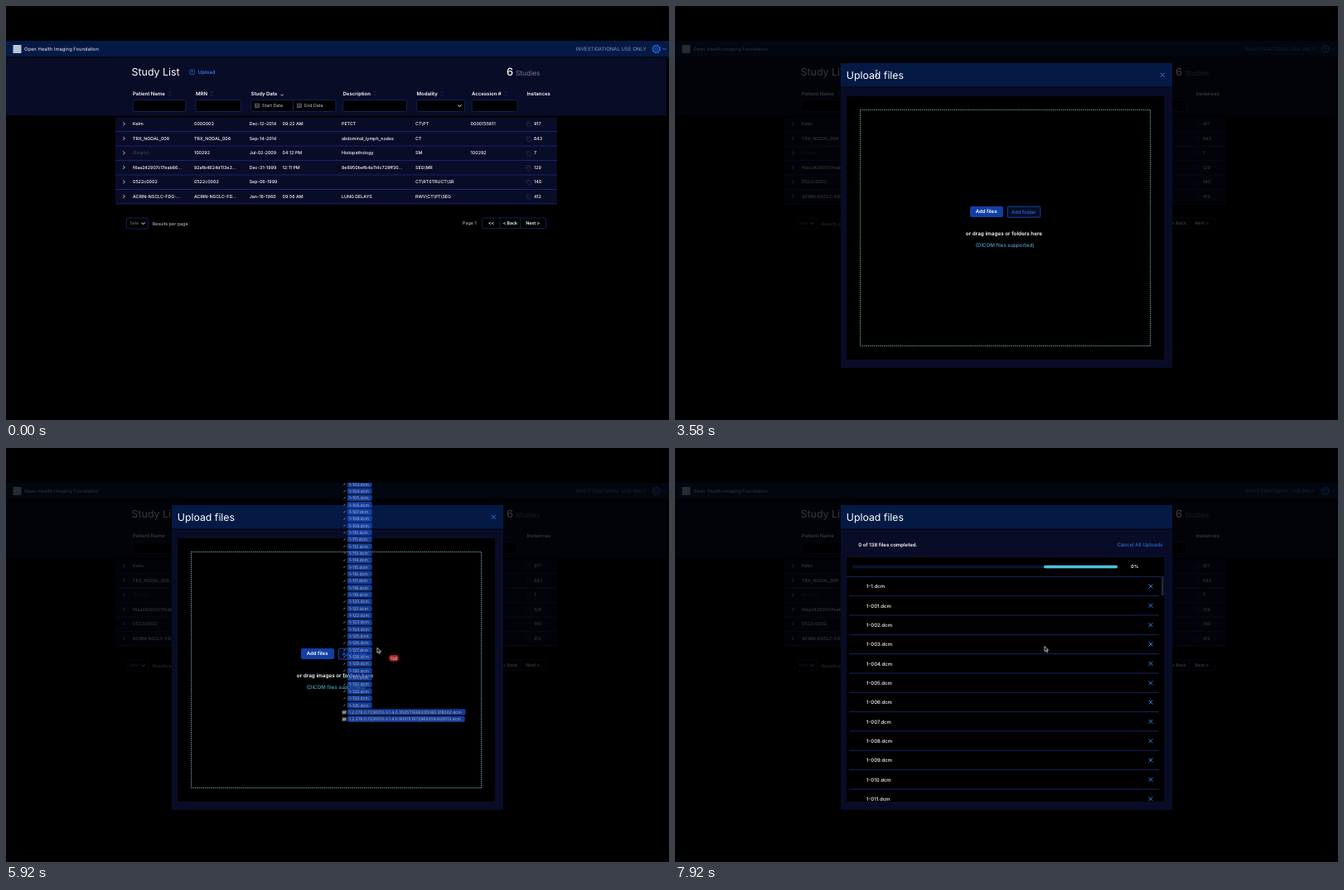
These frames come from a looping animation (800 px wide and 500 px high, 8 s). An HTML page:

```html
<!DOCTYPE html>
<html lang="en">
<head>
<meta charset="utf-8">
<title>Study list upload</title>
<style>
html, body { margin: 0; width: 100%; height: 100%; overflow: hidden; background: #000; }
svg { display: block; width: 100%; height: 100%; }
text { font-family: Inter, Roboto, sans-serif; text-rendering: geometricPrecision; white-space: pre; }
.loop { animation: 8s step-end infinite; }
#modal { animation-name: modal; }
#drop { animation-name: drop; }
#list { animation-name: list; }
#arrow { animation-name: arrow; }
#hand { animation-name: hand; }
#beam { animation-name: beam; }
#plus { animation-name: plus; }
#cursor { animation: cursor 8s linear infinite; }
#drag { animation: drag 8s linear infinite; }
#files { animation: gather 8s ease-out infinite; }
#bar { animation: side 1s ease-in-out -.96s infinite alternate; }

@keyframes modal { 0% { visibility: hidden } 44.7%, 100% { visibility: visible } }
@keyframes drop { 0% { opacity: 1 } 89.55%, 100% { opacity: 0 } }
@keyframes list { 0% { opacity: 0 } 89.55%, 100% { opacity: 1 } }
@keyframes arrow {
  0% { opacity: 0 } 22.8% { opacity: 1 } 33.3% { opacity: 0 } 45.8% { opacity: 1 }
  52.1% { opacity: 0 } 59.3%, 100% { opacity: 1 }
}
@keyframes hand { 0% { opacity: 0 } 33.3% { opacity: 1 } 44.7%, 100% { opacity: 0 } }
@keyframes beam { 0% { opacity: 0 } 44.7% { opacity: 1 } 45.8%, 100% { opacity: 0 } }
@keyframes plus { 0% { opacity: 0 } 80.2% { opacity: 1 } 84.3%, 100% { opacity: 0 } }
@keyframes cursor {
  0%, 22.6% { transform: translate(778px, 335px); animation-timing-function: ease-out }
  32.3% { transform: translate(246px, 81px) }
  36.5%, 44.8% { transform: translate(243px, 80px); animation-timing-function: ease-in-out }
  52.1% { transform: translate(805px, 262px); animation-timing-function: step-end }
  59.3% { transform: translate(772px, 266px) }
  61.7% { transform: translate(620px, 265px) }
  64.6% { transform: translate(525.5px, 261px) }
  68.8% { transform: translate(461px, 246px) }
  71.8% { transform: translate(448.5px, 242px) }
  77.1% { transform: translate(447px, 240px) }
  80%, 100% { transform: translate(446px, 239.5px) }
}
@keyframes drag {
  0%, 69.4% { opacity: 0 } 71.8%, 72.8% { opacity: .68 }
  77.1%, 82.2% { opacity: 1 } 84.4%, 100% { opacity: 0 }
}
@keyframes gather {
  0%, 69.4% { transform: translateX(-34px) }
  71.8%, 72.8% { transform: translateX(-22px) }
  77.1%, 100% { transform: none }
}
@keyframes side { from { transform: translateX(-80px) } to { transform: translateX(240px) } }
</style>
</head>
<body>
<svg id="stage" viewBox="0 0 800 500"></svg>
<script>
const NAVY = '#041a45', PANEL = '#090c27', EDGE = '#14296b', LINE = '#202c7c', BLUE = '#2f7df0';

// y is the vertical middle of the capitals
const text = (x, y, size, str, fill = '#fff', weight = 400) =>
  `<text x="${x}" y="${(y + size * .364).toFixed(2)}" font-size="${size}" fill="${fill}" font-weight="${weight}">${
    str.replace(/</g, '&lt;').replace(/>/g, '&gt;')}</text>`;
const rect = (x, y, w, h, fill, extra = '') =>
  `<rect x="${x}" y="${y}" width="${w}" height="${h}" fill="${fill}" ${extra}/>`;
const path = (d, stroke, width = .8, fill = 'none') =>
  `<path d="${d}" stroke="${stroke}" stroke-width="${width}" fill="${fill}"/>`;
const box = (x, w, y = 113.5, h = 14, fill = '#000', stroke = EDGE) =>
  rect(x, y, w, h, fill, `stroke="${stroke}" stroke-width=".8" rx="1.5"`);
const group = (id, body, cls = 'loop') => `<g id="${id}" class="${cls}">${body}</g>`;
const chevron = (x, y, stroke = '#fff') => path(`M${x - 2} ${y - 1}l2 2 2-2`, stroke, 1);
const cross = (x, y, r = 2.4) =>
  path(`M${x - r} ${y - r}l${2 * r} ${2 * r}m0 ${-2 * r}l${-2 * r} ${2 * r}`, BLUE, 1);

function header() {
  const gear = `<circle cx="784.7" cy="52" r="4" fill="none" stroke="${BLUE}" stroke-width="1"/>` +
    `<circle cx="784.7" cy="52" r="4.8" fill="none" stroke="${BLUE}" stroke-width="1" stroke-dasharray="1.9 1.87"/>` +
    `<circle cx="784.7" cy="52" r="1.6" fill="none" stroke="${BLUE}" stroke-width=".8"/>`;
  return rect(0, 42, 800, 19.5, NAVY) + rect(0, 61.5, 800, 2.5, '#040817') +
    rect(0, 64, 797, 68.5, PANEL) + rect(8.5, 47, 10, 10, '#b9c3d6') +
    text(22, 52.2, 5.8, 'Open Health Imaging Foundation', '#e4e9f4') +
    text(687.6, 51.8, 6, 'INVESTIGATIONAL USE ONLY', '#8793b3') + gear + chevron(794.5, 52, BLUE) +
    text(151.6, 79.5, 12.4, 'Study List') +
    `<circle cx="224.6" cy="79.7" r="3.2" fill="none" stroke="#2560c8" stroke-width=".8"/>` +
    path('M224.6 81.5v-3.4m-1.3 1.3l1.3-1.3 1.3 1.3', '#2560c8', .7) +
    text(231.8, 79.8, 6, 'Upload', BLUE, 600) +
    text(604, 79.6, 12.8, '6', '#fff', 500) + text(615, 80.7, 8.4, 'Studies', '#747a8e');
}

function filters() {
  const labels = [[153, 'Patient Name', 198], [229, 'MRN', 248], [295.5, 'Study Date'], [406.5, 'Description', 445],
    [495.5, 'Modality', 526], [562, 'Accession #', 603], [628.5, 'Instances']];
  const sort = x => x
    ? path(`M${x - 1.6} 104.6l1.6-1.6 1.6 1.6m-3.2 2.2l1.6 1.6 1.6-1.6`, '#17357c', .8) : '';
  const calendar = x => rect(x, 118, 5, 4.6, 'none', 'stroke="#747a8e" stroke-width=".7"') +
    path(`M${x} 119.6h5m-5 1.5h5m-3.4-1.5v3m1.7-3v3`, '#747a8e', .5);
  return labels.map(([x, s, arrow]) => text(x, 105.6, 6, s, '#fff', 600) + sort(arrow)).join('') +
    path('M331.6 106.9l1.5 1.3 1.5-1.3', '#fff', .8) +
    [[153.2, 63.6], [229, 54.6], [295.5, 51.2], [346.7, 51.2], [406.6, 77], [495.6, 58], [562.2, 54.8]]
      .map(([x, w]) => box(x, w)).join('') +
    calendar(300.5) + text(309, 120.4, 5.3, 'Start Date', '#c8ccd8') +
    calendar(351.5) + text(360, 120.4, 5.3, 'End Date', '#c8ccd8') + chevron(547.5, 120.5);
}

function studies() {
  const rows = [
    ['Kelm', '0000003', 'Dec-12-2014', '09:22 AM', 'PETCT', 'CT\\PT', '0000155811', '917'],
    ['TRX_NODAL_008', 'TRX_NODAL_008', 'Sep-14-2014', '', 'abdominal_lymph_nodes', 'CT', '', '643'],
    ['(Empty)', '100292', 'Jul-02-2009', '04:12 PM', 'Histopathology', 'SM', '100292', '7'],
    ['f4aa242907c17eab66...', '92afb4624d113e3...', 'Dec-31-1999', '12:11 PM', '8e8950befb4a114c729ff30...', 'SEG\\MR', '', '129'],
    ['0522c0002', '0522c0002', 'Sep-06-1999', '', '', 'CT\\RTSTRUCT\\SR', '', '140'],
    ['ACRIN-NSCLC-FDG-...', 'ACRIN-NSCLC-FD...', 'Jan-16-1960', '09:56 AM', 'LUNG DELAYS', 'RWV\\CT\\PT\\SEG', '', '412']];
  const columns = [153, 227, 293.7, 333.6, 405, 494, 560.6, 637];
  return rect(132, 134.5, 533, 104.5, PANEL, 'rx="1.5"') + rows.map((row, i) => {
    const y = 142.3 + i * 17.5;
    return path(`M141.3 ${y - 1.9}l2 2-2 2`, '#dfe4f2', .9) +
      row.map((s, c) => text(columns[c], y, 5.3, s, s === '(Empty)' ? '#3d4158' : '#fff', 500)).join('') +
      path(`M628 ${y + 1.6}v-3.6h4m-2.8 1.2h4.1v4.2h-4.1z`, '#17285c', .8) +
      path(`M132 ${y + 9.2}h533`, LINE);
  }).join('');
}

function pager() {
  return box(145.4, 26, 256, 13) + text(149.5, 262.6, 5.2, 'Sele', '#747a8e') + chevron(165.5, 262.6) +
    text(176.7, 262.6, 5.4, 'Results per page', '#c6cad6') +
    text(551, 262, 5.4, 'Page 1', '#c6cad6') + box(574.6, 76.8, 256, 12.6) +
    path('M596 256v12.6m24.6-12.6v12.6', EDGE) +
    text(582, 262.2, 5.3, '<<', '#fff', 600) + text(599.8, 262.2, 5.2, '< Back', '#fff', 600) +
    text(627.2, 262.2, 5.3, 'Next >', '#fff', 600);
}

function dropZone() {
  return cross(588.3, 83.3) + rect(207, 109, 383, 318, '#000') +
    rect(223.5, 125.5, 350, 285, 'none', 'stroke="#8fc3d2" stroke-width=".8" stroke-dasharray="1.4 1"') +
    rect(356, 242, 40, 13, '#123fa6', 'rx="2"') + text(362.8, 248.3, 6, 'Add files', '#fff', 600) +
    box(401.2, 39.6, 242.2, 13, '#070c28', '#2456bd') + text(405.8, 248.6, 6, 'Add folder', BLUE) +
    text(350.8, 274.2, 6.35, 'or drag images or folders here', '#fff', 600) +
    text(362.8, 288.6, 6.15, '(DICOM files supported)', '#5fb8dc');
}

function uploadList() {
  const rows = Array.from({ length: 12 }, (_, i) => {
    const y = 167 + i * 23.34, name = i ? String(i).padStart(3, '0') : '1';
    return text(231, y, 6, `1-${name}.dcm`, '#fff', 500) + cross(574, y) + path(`M210 ${y + 11.6}h374`, LINE);
  }).join('');
  return text(221.2, 116.6, 6, '0 of 138 files completed.', '#fff', 600) +
    text(533.4, 116.6, 6.15, 'Cancel All Uploads', BLUE) +
    rect(207, 132, 383, 295, '#000') + path('M207 155.4h383', LINE) +
    rect(214, 141.5, 320, 4, '#0a1330', 'rx="2"') +
    `<g clip-path="url(#track)"><rect id="bar" x="214" y="141.5" width="160" height="4" rx="2" fill="#4cc2de"/></g>` +
    text(550, 143.3, 5.6, '0%', '#fff', 600) +
    `<g clip-path="url(#rows)">${rows}</g>` + rect(587, 156, 2.6, 22.5, '#1a2c45', 'rx="1.3"');
}

function draggedFiles() {
  const names = Array.from({ length: 33 }, (_, i) => `1-${103 + i}.dcm`);
  names.push('1.2.276.0.7230010.3.1.4.0.35057.1666305080.318262.dcm',
    '1.2.276.0.7230010.3.1.4.0.90015.1672969359.829513.dcm');
  const files = names.map((name, i) => {
    const y = 43.8 + i * 8.34, long = i > 32;
    return rect(424.4, y - 3.7, long ? 143 - (i - 33) : 30, 7.3, '#1b4fc4', 'rx="2"') +
      text(426.4, y, 5, name, '#e6edff') +
      (long ? rect(418.4, y - 2, 5, 4.4, '#8d929c') + path(`M418.6 ${y + 1.8}l1.6-2 1.2 1 1.6-2`, '#fff', .7)
        : path(`M420.2 ${y + 1}l2-2`, '#b5b8c0', 1));
  }).join('');
  return `<g clip-path="url(#screen)">${group('files', files, '')}</g>` +
    rect(462, 249.8, 12, 8, '#d3262c', 'rx="4"') + text(463.7, 253.8, 5, '138', '#fff', 600);
}

function pointer() {
  return group('arrow', path('M0 0v6.2l1.5-1.3 1 2.3 1.1-.5-1-2.2h2z', '#fff', .7, '#000')) +
    group('hand', path('M.3 3.6l-1.3-.2 2 3.6h3.2l.8-2.2v-1.5l-3-.6v-2.6q-.6-.8-1.1 0v3.6z', '#111', .4, '#fff')) +
    group('beam', path('M-1.6-2.6q1.6 0 1.6 1v5.4q0 1-1.6 1m3.2-7.4q-1.6 0-1.6 1m0 5.4q0 1 1.6 1', '#dfe4ee', .8)) +
    group('plus', '<circle cx="4.4" cy="9" r="2.3" fill="#35b24a"/>' + path('M3 9h2.8m-1.4-1.4v2.8', '#fff', .6));
}

const clip = (id, ...r) => `<clipPath id="${id}">${rect(...r, '#000', id === 'track' ? 'rx="2"' : '')}</clipPath>`;

document.getElementById('stage').innerHTML =
  `<defs>${clip('track', 214, 141.5, 320, 4)}${clip('rows', 207, 156, 383, 271)}${clip('screen', 0, 42, 800, 400)}</defs>` +
  rect(0, 0, 800, 500, '#000') + header() + filters() + studies() + pager() +
  group('modal', rect(0, 42, 800, 458, '#000', 'opacity=".78"') +
    rect(200, 69, 400, 368, PANEL) + rect(200, 69, 400, 28.5, NAVY) + rect(200, 97.5, 400, 1, '#02040e') +
    text(206.8, 83.2, 12.3, 'Upload files') +
    group('drop', dropZone()) + group('list', uploadList())) +
  group('drag', draggedFiles(), '') + group('cursor', pointer(), '');
</script>
</body>
</html>
```
